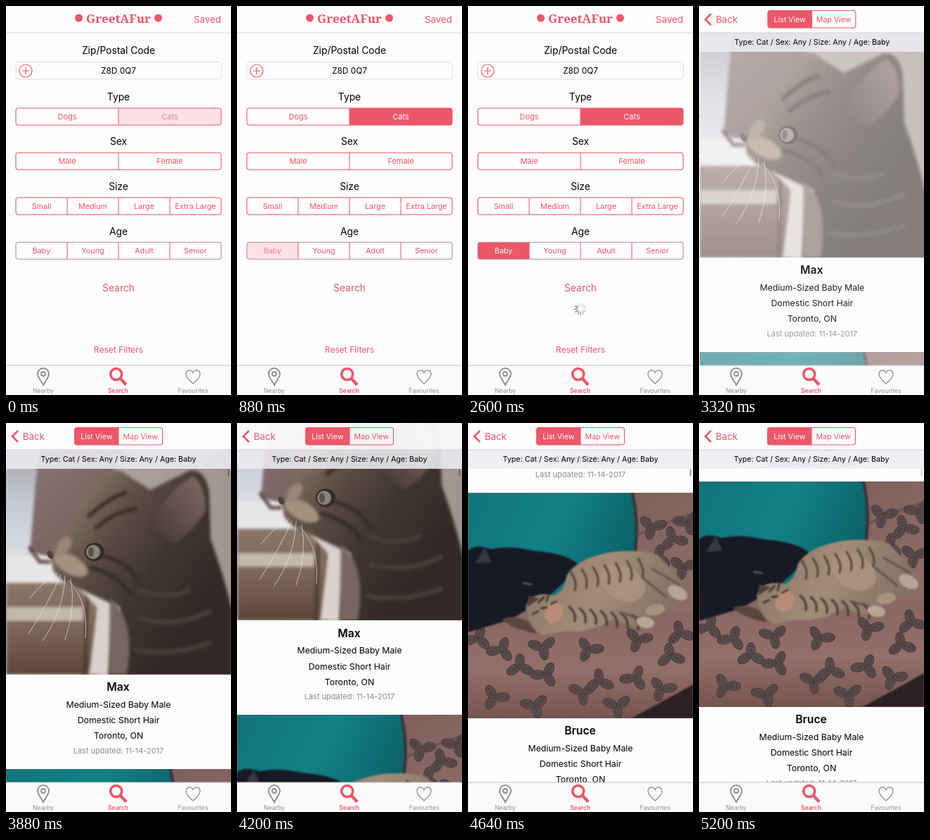
An HTML page with a canvas for the animation above (5.24 s loop, 320 by 552 pixels).

```html
<!DOCTYPE html>
<html lang="en">
<head>
<meta charset="utf-8">
<title>Pet search</title>
<style>
html, body { margin: 0; width: 100%; height: 100%; overflow: hidden; background: #fefdfe; }
canvas { display: block; width: 320px; height: 552px; }
</style>
</head>
<body>
<canvas id="stage"></canvas>
<script>
const W = 320, H = 552, LOOP = 5240, STEP = 40;
const PINK = [236, 87, 106], PALE = [250, 226, 231], WHITE = [254, 253, 254];
const GREY = '#8e8e93', PAPER = '#fefdfe';
const PHOTO = 320, CELL = 454, TOP = 37, TAB_TOP = 510, SCROLL = 408;

const canvas = document.getElementById('stage');
const dpr = window.devicePixelRatio || 1;
canvas.width = W * dpr;
canvas.height = H * dpr;
const ctx = canvas.getContext('2d');

const clamp = v => Math.max(0, Math.min(1, v));
const ramp = (t, from, to) => clamp((t - from) / (to - from));
const rgb = c => `rgb(${c.join(',')})`;
const mix = (a, b, p) => a.map((v, i) => v + (b[i] - v) * p);
const pink = rgb(PINK);

function fill(g, path, color) {
  g.fillStyle = color;
  g.fill(typeof path === 'string' ? new Path2D(path) : path);
}

function line(g, path, color, width) {
  g.strokeStyle = color;
  g.lineWidth = width;
  g.stroke(typeof path === 'string' ? new Path2D(path) : path);
}

function box(g, x, y, w, h, color) {
  g.fillStyle = color;
  g.fillRect(x, y, w, h);
}

function oval(g, x, y, rx, ry, color, angle = 0) {
  g.beginPath();
  g.ellipse(x, y, rx, ry, angle, 0, 7);
  g.fillStyle = color;
  g.fill();
}

function rounded(x, y, w, h, r) {
  const path = new Path2D();
  path.roundRect(x, y, w, h, r);
  return path;
}

function group(alpha, dx, draw) {
  ctx.save();
  ctx.globalAlpha *= alpha;
  ctx.translate(dx, 0);
  draw();
  ctx.restore();
}

// y is the middle of the capital letters
function text(str, x, y, size, color = '#000', weight = 400, family = 'Inter, sans-serif') {
  ctx.font = `${weight} ${size}px ${family}`;
  ctx.textAlign = 'center';
  ctx.fillStyle = color;
  ctx.fillText(str, x, y + size * 0.364);
}

function blend(g, x0, y0, x1, y1, ...colors) {
  const grad = g.createLinearGradient(x0, y0, x1, y1);
  colors.forEach((c, i) => grad.addColorStop(i / (colors.length - 1), c));
  return grad;
}

function photo(draw) {
  const c = document.createElement('canvas');
  c.width = c.height = PHOTO;
  const g = c.getContext('2d');
  g.lineCap = 'round';
  draw(g);
  return c;
}

const kitten = photo(g => {
  box(g, 0, 0, 320, 320, blend(g, 0, 0, 320, 0, '#d3d5dc', '#aaa29f', '#a0968f'));
  g.filter = 'blur(2px)';
  box(g, 0, 0, 44, 150, blend(g, 0, 0, 0, 150, '#a9a5a5', '#c4c9d2', '#dadde2'));
  box(g, 0, 150, 130, 42, '#e8e7e8');
  box(g, 0, 190, 130, 130, blend(g, 0, 190, 0, 320, '#8a776a', '#7b6657', '#5d473b'));
  box(g, 0, 224, 110, 20, '#c3b8ad');
  fill(g, 'M46 0H170L130 70L62 152L34 146Z', blend(g, 40, 0, 140, 100, '#8a7676', '#75605f'));
  line(g, 'M34 140L48 160H62', '#5d4846', 5);
  line(g, 'M116 200L112 320', '#49372f', 4);
  fill(g, 'M72 165L170 195L165 320H118L130 225Z', '#d8d1cd');
  fill(g, 'M60 148C70 130 88 112 98 84L130 48Q150 24 165 32L205 58L262 30Q284 28 289 62L291 128Q310 180 322 230V322H146Q150 270 162 225Q120 205 85 190Q64 176 66 164Z',
    blend(g, 60, 100, 260, 240, '#8c7a6c', '#5c4d45', '#3f3530', '#332a27'));
  fill(g, 'M204 112Q225 62 266 38Q284 50 284 88Q262 122 238 134Z', blend(g, 205, 110, 280, 50, '#4a3d39', '#7b655f'));
  oval(g, 92, 164, 27, 13, '#a5917f', 0.5);
  oval(g, 82, 138, 9, 15, '#99877a', 0.6);
  fill(g, 'M148 212Q185 240 172 320H146Z', '#75675f');
  line(g, 'M140 152Q175 160 190 190M120 168Q160 178 176 205M118 95Q145 70 170 62M128 112Q155 88 185 85', '#352b28', 5);
  line(g, 'M190 200Q230 215 260 200M190 240Q240 255 290 230M185 285Q235 295 290 275', '#4b403a', 6);
  g.filter = 'blur(.7px)';
  oval(g, 126, 146, 14, 13, '#342a26');
  oval(g, 124, 146, 10, 10, '#8b827b');
  oval(g, 121, 146, 4, 7, '#57504c');
  oval(g, 63, 150, 4, 6, '#4f403c', -0.5);
  line(g, 'M78 178Q60 220 32 262M84 180Q82 230 52 272M92 184Q100 225 84 270M74 176Q50 190 34 212M88 186Q118 215 113 268', 'rgba(240,236,233,.65)', 1);
});

function motif(g, x, y, turn) {
  for (let i = 0; i < 3; i++) {
    const a = turn + i * 2.1;
    const cx = x + Math.cos(a) * 11, cy = y + Math.sin(a) * 8;
    oval(g, cx, cy, 11, 7, '#4d4042', a);
    for (const r of [0.35, 0.7]) {
      g.beginPath();
      g.ellipse(cx, cy, 11 * r, 7 * r, a, 0, 7);
      g.strokeStyle = '#74605e';
      g.lineWidth = 0.8;
      g.stroke();
    }
  }
}

const sofa = photo(g => {
  box(g, 0, 0, 320, 320, blend(g, 0, 180, 0, 320, '#8a6762', '#936f69', '#76544f'));
  fill(g, 'M238 0H320V170H240Z', blend(g, 238, 0, 320, 120, '#7d605d', '#8d6c67'));
  const motifs = [38, 290, 74, 247, 110, 258, 163, 283, 172, 222, 187, 268, 237, 263, 212, 302, 276, 278,
    288, 232, 47, 223, 106, 219, 242, 208, 302, 200, 14, 207, 95, 302, 262, 48, 292, 66, 270, 92, 312, 42, 306, 105];
  for (let i = 0; i < motifs.length; i += 2) motif(g, motifs[i], motifs[i + 1], i * 1.3);
  g.filter = 'blur(1px)';
  fill(g, 'M0 0H235L241 50L236 120L150 150H0Z', blend(g, 0, 0, 240, 110, '#11757b', '#128087', '#0b5d64'));
  line(g, 'M234 0Q243 40 238 82', '#3b3034', 4);
  line(g, 'M240 60Q280 42 320 30', '#5d4645', 2);
  fill(g, 'M0 82Q10 72 32 80Q58 74 92 82Q145 86 160 105L112 150L60 180L0 198Z', '#171a24');
  fill(g, 'M10 100L24 78L33 98Z', '#383940');
  line(g, 'M78 128L90 130', '#6c6d75', 2);
  fill(g, 'M48 180Q62 172 85 182L98 200Q65 194 48 180Z', '#5a4541');
  fill(g, 'M140 118Q155 92 205 84Q245 80 270 88L300 120L316 140Q312 152 295 150L306 160Q296 170 276 158L282 170Q262 178 250 168L266 184Q255 196 238 190L206 180Q172 200 140 196L106 202Q86 190 82 162Q90 138 122 146Q138 138 140 118Z',
    blend(g, 90, 100, 280, 180, '#8c7767', '#a28c79', '#857263'));
  oval(g, 220, 128, 34, 24, '#a9917f', 0.5);
  fill(g, 'M84 162L86 146L102 150Z', '#4f4038');
  oval(g, 122, 170, 13, 16, '#b78c78', 0.4);
  for (let i = 0; i < 7; i++) {
    line(g, `M${146 + i * 16} ${112 - i * 3}q10 14 6 26`, '#544439', 3);
    line(g, `M${144 + i * 15} ${162 + i * 2}q10 8 8 20`, '#4f4037', 3.5);
  }
  line(g, 'M100 156L108 148M112 154L114 146M92 172L100 168M104 164L112 163M118 158L126 154', '#392e29', 2.5);
  line(g, 'M250 122L282 148M262 108L300 130M216 170L252 180', '#67554a', 3);
  oval(g, 298, 142, 15, 9, '#b7a596', 0.5);
  oval(g, 252, 184, 13, 8, '#b7a596', 0.2);
  oval(g, 266, 166, 14, 8, '#a8917f', -0.2);
  fill(g, 'M320 272Q270 300 232 320H320Z', '#2c2022');
});

const segments = {
  type: ['Dogs', 'Cats'],
  sex: ['Male', 'Female'],
  size: ['Small', 'Medium', 'Large', 'Extra Large'],
  age: ['Baby', 'Young', 'Adult', 'Senior']
};

// level: null is off, 0 is pressed, 1 is selected
function segmented(labels, x, y, w, h, size, active, level, edge = pink) {
  const cell = w / labels.length, frame = rounded(x, y, w, h, 3.5);
  ctx.save();
  ctx.clip(frame);
  if (level !== null) box(ctx, x + active * cell, y, cell, h, rgb(mix(PALE, PINK, level)));
  ctx.restore();
  labels.forEach((label, i) => {
    if (i) box(ctx, x + i * cell - 0.5, y, 1, h, pink);
    const on = i === active && level !== null;
    const color = on ? mix([233, 130, 145], WHITE, level) : PINK;
    text(label, x + (i + 0.5) * cell, y + h / 2, size, rgb(color));
  });
  line(ctx, frame, edge, 1.1);
}

function spinner(t) {
  const head = Math.floor(t / 83.3);
  ctx.lineCap = 'round';
  for (let i = 0; i < 12; i++) {
    const a = i * Math.PI / 6, age = (head - i + 120) % 12;
    const c = Math.cos(a), s = Math.sin(a);
    line(ctx, `M${160 + c * 4.6} ${430 + s * 4.6}L${160 + c * 8.2} ${430 + s * 8.2}`,
      `rgba(110,110,115,${Math.max(0.25, 0.95 - age * 0.1)})`, 1.7);
  }
  ctx.lineCap = 'butt';
}

function searchPage(t) {
  box(ctx, 0, 38, W, 472, PAPER);
  text('Zip/Postal Code', 160, 63, 13.8);
  line(ctx, rounded(14, 79.5, 292.5, 24.5, 4), '#dedde0', 1);
  text('Z8D 0Q7', 160, 91.5, 11.8);
  ctx.beginPath();
  ctx.arc(28, 92, 9, 0, 7);
  ctx.strokeStyle = pink;
  ctx.lineWidth = 1.2;
  ctx.stroke();
  line(ctx, 'M23 92H33M28 87V97', pink, 1.2);

  const cats = ramp(t, 40, 240);
  const baby = t < 880 ? null : ramp(t, 960, 1160);
  text('Type', 160, 128.5, 13.8);
  segmented(segments.type, 14, 145, 292, 24, 11, 1, cats);
  text('Sex', 160, 192, 13.8);
  segmented(segments.sex, 14, 208.3, 292, 24, 11, 0, null);
  text('Size', 160, 256, 13.8);
  segmented(segments.size, 14, 272, 292, 24, 10.8, 0, null);
  text('Age', 160, 319.5, 13.8);
  segmented(segments.age, 14, 335.3, 292, 24, 10.8, 0, baby, '#b98a93');

  const pressed = ramp(t, 1880, 2000) * (1 - ramp(t, 2120, 2440));
  group(1 - 0.75 * pressed, 0, () => text('Search', 160, 400, 13.9, pink));
  if (t >= 2120) spinner(t);
  text('Reset Filters', 160, 487.5, 12.1, pink);
}

function scrollAt(t) {
  const decay = ms => {
    const x = ms / 95;
    return 1 - (1 + x + x * x / 2) * Math.exp(-x);
  };
  return SCROLL * decay(Math.max(0, Math.min(720, t - 4060))) / decay(720);
}

function petCell(name, picture, y, fade) {
  const soft = 1 - (1 - fade) ** 3;
  box(ctx, 0, y, W, CELL, PAPER);
  ctx.drawImage(picture, 0, y);
  box(ctx, 0, y, W, PHOTO, `rgba(254,253,254,${1 - (0.2 + 0.8 * fade)})`);
  group(soft, 0, () => {
    const base = y + PHOTO;
    text(name, 159.5, base + 17.7, 15.7, '#000', 600);
    text('Medium-Sized Baby Male', 160, base + 42.5, 12.3);
    text('Domestic Short Hair', 160, base + 64.8, 12.3);
    text('Toronto, ON', 160, base + 87, 12.3);
    text('Last updated: 11-14-2017', 160, base + 108, 11, '#8a898c');
  });
}

function listPage(t) {
  box(ctx, 0, 0, W, TAB_TOP, PAPER);
  const top = TOP - scrollAt(t), fade = ramp(t, 3080, 3560);
  petCell('Max', kitten, top, fade);
  petCell('Bruce', sofa, top + CELL, fade);
  box(ctx, 0, 38, W, 27, 'rgba(237,236,242,.88)');
  text('Type: Cat / Sex: Any / Size: Any / Age: Baby', 160, 51.3, 10.7);
  const bar = ramp(t, 3600, 3720) * (1 - 0.6 * ramp(t, 4920, 5200));
  group(bar, 0, () => fill(ctx, rounded(315.5, 65.5, 2, 10, 1), 'rgba(70,70,75,.6)'));
}

function navBar(p) {
  box(ctx, 0, 0, W, 38, 'rgba(254,253,254,.94)');
  box(ctx, 0, 37.5, W, 1, '#d3d1d5');
  if (p < 1) group(1 - p, -100 * p, () => {
    text('GreetAFur', 160, 18, 17, pink, 700, '"Noto Serif", serif');
    oval(ctx, 103.5, 17, 5.5, 5.5, pink);
    oval(ctx, 216.5, 17, 5.5, 5.5, pink);
  });
  if (p < 1) group(1 - p, 0, () => text('Saved', 286.5, 19, 13.3, pink));
  if (p > 0) {
    group(p, 60 * (1 - p), () => {
      line(ctx, 'M17 11L9 19L17 27', pink, 2.6);
      text('Back', 39.3, 19, 13.3, pink);
    });
    group(p, 130 * (1 - p), () =>
      segmented(['List View', 'Map View'], 97.5, 6.5, 125, 24.5, 10.6, 0, 1));
  }
}

function tabBar() {
  box(ctx, 0, TAB_TOP, W, 42, '#fbfafb');
  box(ctx, 0, TAB_TOP - 0.5, W, 1, '#c3c1c5');
  line(ctx, 'M53 538C50 532 45 527 45 522A8 8 0 0 1 61 522C61 527 56 532 53 538Z', GREY, 1.9);
  line(ctx, 'M50 522A3 3 0 1 1 56 522A3 3 0 1 1 50 522Z', GREY, 1.8);
  line(ctx, 'M148.7 522.5A8 8 0 1 1 164.7 522.5A8 8 0 1 1 148.7 522.5Z', pink, 3.6);
  line(ctx, 'M162.5 528.5L171 537.5', pink, 4.6);
  line(ctx, 'M266 536C258 529 256 526 256 522.5C256 516 263.5 515 266 520.5C268.5 515 276 516 276 522.5C276 526 274 529 266 536Z', GREY, 1.3);
  text('Nearby', 53, 546, 8.7, GREY);
  text('Search', 159.5, 546, 8.5, pink, 600);
  text('Favourites', 266, 546, 8.8, GREY);
}

function pushAt(t) {
  const x = Math.max(0, t - 2870) / 55;
  return t >= 3400 ? 1 : 1 - (1 + x) * Math.exp(-x);
}

function render(now) {
  const t = Math.floor((now % LOOP) / STEP) * STEP;
  const p = pushAt(t);
  ctx.setTransform(dpr, 0, 0, dpr, 0, 0);
  box(ctx, 0, 0, W, H, PAPER);
  ctx.save();
  ctx.beginPath();
  ctx.rect(0, 0, W, TAB_TOP);
  ctx.clip();
  if (p < 1) group(1, -96 * p, () => searchPage(t));
  if (p > 0) group(1, W * (1 - p), () => listPage(t));
  ctx.restore();
  navBar(p);
  tabBar();
}

const start = performance.now();
function tick() {
  render(performance.now() - start);
  requestAnimationFrame(tick);
}
tick();
</script>
</body>
</html>
```
